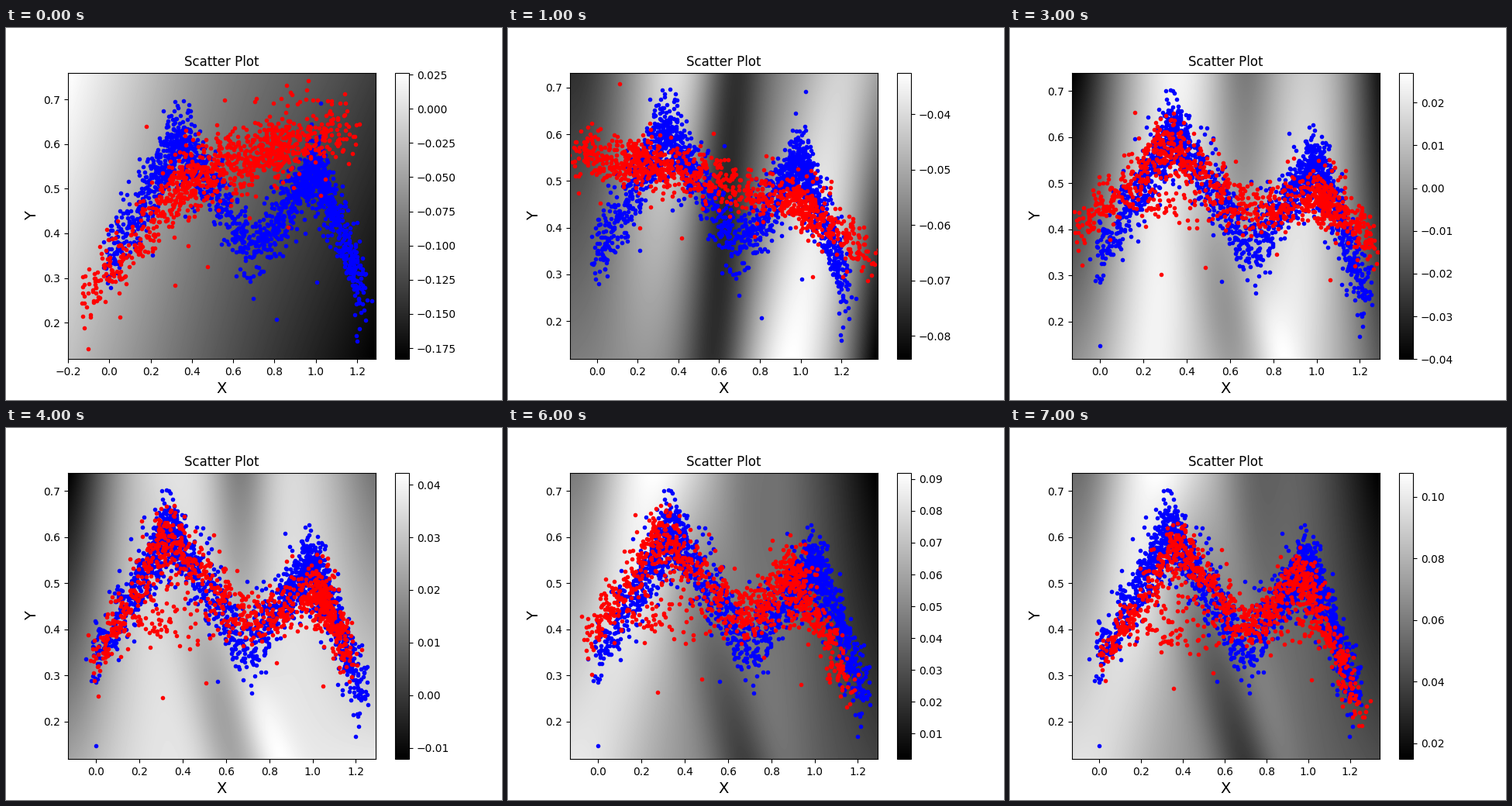
A matplotlib script for the animation above (8000 ms loop, 640x480 px).

```python
import numpy as np
import matplotlib.pyplot as plt
from matplotlib.animation import FuncAnimation

plt.rcParams["font.family"] = "DejaVu Sans"
U, V = np.meshgrid(np.linspace(0, 1, 140), np.linspace(0, 1, 100))


def shade(across, up, *ridges):
    """Plane plus leaning ridges: centre, lean, width, height low and high."""
    f = across * U + up * V
    for centre, lean, width, low, high in ridges:
        height = low + (high - low) * V
        f += height * np.exp(-((U - centre - lean * V) / width) ** 2)
    return f


def scaled(field, low, high):
    return np.interp(field, (field.min(), field.max()), (low, high))


def cloud(corners, n, spread, seed, sag=0.0):
    """Heavy-tailed scatter along a polyline; sag fills in under its arches."""
    rng = np.random.default_rng(seed)
    t = rng.random(n)
    t += 0.5 * np.sin(4 * np.pi * t) / (4 * np.pi)
    xs, ys = zip(*corners)
    knots = np.linspace(0, 1, len(corners))
    x, y = np.interp(t, knots, xs), np.interp(t, knots, ys)
    dip = ys[len(ys) // 2]
    drop = rng.random(n) * (rng.random(n) < 0.3)
    y -= sag * drop * np.maximum(y - dip, 0)
    noise = rng.standard_t(6, (2, n))
    return np.column_stack([x + 0.019 * noise[0], y + spread * noise[1]])


def red(corners, spread, sag=0.0):
    return cloud(corners, 1000, spread, 5, sag)


def mix(a, b, w=0.5):
    return a * (1 - w) + b * w


wave = [(-.01, .33), (.34, .615), (.70, .35), (1.0, .55), (1.23, .25)]
blue_a, blue_b = (cloud(wave, 1700, .029, seed) for seed in (1, 2))

rise = red([(-.12, .25), (.34, .50), (.58, .56), (.8, .59), (1.17, .64)], .034)
fall = red([(-.1, .56), (.22, .535), (.6, .5), (1.0, .45), (1.34, .34)], .024)
drift = red([(-.32, .555), (.25, .545), (.6, .5), (1.0, .45), (1.5, .43)], .022)
fit = red([(0, .33), (.32, .61), (.68, .42), (1.03, .49), (1.17, .34)],
          .025, 1.3)
shift = red([(-.1, .42), (.2, .63), (.62, .45), (.82, .54), (1.06, .34)],
            .032, 1.2)
match = red([(.02, .34), (.37, .59), (.7, .4), (.97, .53), (1.25, .22)],
            .018, 1.3)

slope = shade(-.75, .25, (.5, 0, .35, -.05, -.12))
valley = shade(0, 0, (0, 0, .15, 0, -.25), (.24, .1, .14, .1, .35),
               (.47, .06, .1, -.3, -.3), (.72, .17, .16, .45, .3),
               (1.02, .02, .1, -.45, -.05))
hills = shade(0, 0, (0, 0, .12, 0, -.2), (.25, .08, .15, .4, .4),
              (.69, .13, .14, .35, .25), (1.08, 0, .16, -.75, -.75))
mist = shade(0, 0, (-.05, 0, .2, -.3, -1), (.56, 0, .1, .05, -.42),
             (.54, -.25, .1, -.32, 0), (.68, -.35, .07, .12, 0),
             (1.05, 0, .2, 0, -.5))
dusk = shade(-.6, 0, (0, 0, .15, .05, -.3), (.08, .2, .2, .18, .45),
             (.56, -.2, .1, -.2, 0), (.72, -.05, .1, .08, .12),
             (1.05, 0, .2, 0, -.25))
beam = shade(-.5, 0, (0, 0, .15, 0, -.4), (.08, .2, .17, .15, .4),
             (.56, -.3, .1, -.33, 0), (.66, -.2, .08, .1, .05),
             (.6, 0, .1, 0, -.12), (1.05, 0, .2, 0, -.35))

WIDE = (-.1285, 1.2905)
TALL = (.1182, .7402)

# blue, red, field, value range, x limits, y limits
scenes = [
    (blue_a, rise, slope, (-.183, .0264), (-.2, 1.289), (.1184, .7597)),
    (blue_a, fall, valley, (-.0842, -.0325), (-.133, 1.378), (.1186, .732)),
    (blue_b, drift, hills, (-.1151, .0085), (-.4397, 1.662), TALL),
    (blue_b, mix(drift, fit, .7), mix(hills, mist), (-.04, .027), WIDE, TALL),
    (blue_b, fit, mist, (-.01215, .0423), WIDE, TALL),
    (blue_b, shift, dusk, (-.0227, .0749), WIDE, TALL),
    (blue_b, mix(shift, match), mix(dusk, beam), (.002, .092), WIDE, TALL),
    (blue_b, match, beam, (.0148, .1078), (-.13, 1.342), TALL),
]

fig, ax = plt.subplots(figsize=(6.4, 4.8), dpi=100)
image = ax.imshow(slope, cmap="gray", origin="lower", aspect="auto",
                  interpolation="bilinear", zorder=0)
fig.colorbar(image, ax=ax)
blue_dots, = ax.plot([], [], "b.")
red_dots, = ax.plot([], [], "r.")
ax.set_title("Scatter Plot")
ax.set_xlabel("X", fontsize=14)
ax.set_ylabel("Y", fontsize=14)


def draw(i):
    blue, reds, field, limits, xlim, ylim = scenes[i]
    image.set_data(scaled(field, *limits))
    image.set_clim(*limits)
    image.set_extent((*xlim, *ylim))
    blue_dots.set_data(*blue.T)
    red_dots.set_data(*reds.T)
    ax.set_xlim(xlim)
    ax.set_ylim(ylim)
    return image, blue_dots, red_dots


anim = FuncAnimation(fig, draw, frames=len(scenes), interval=1000,
                     init_func=lambda: draw(0), repeat=True, repeat_delay=0)
plt.show()
```
